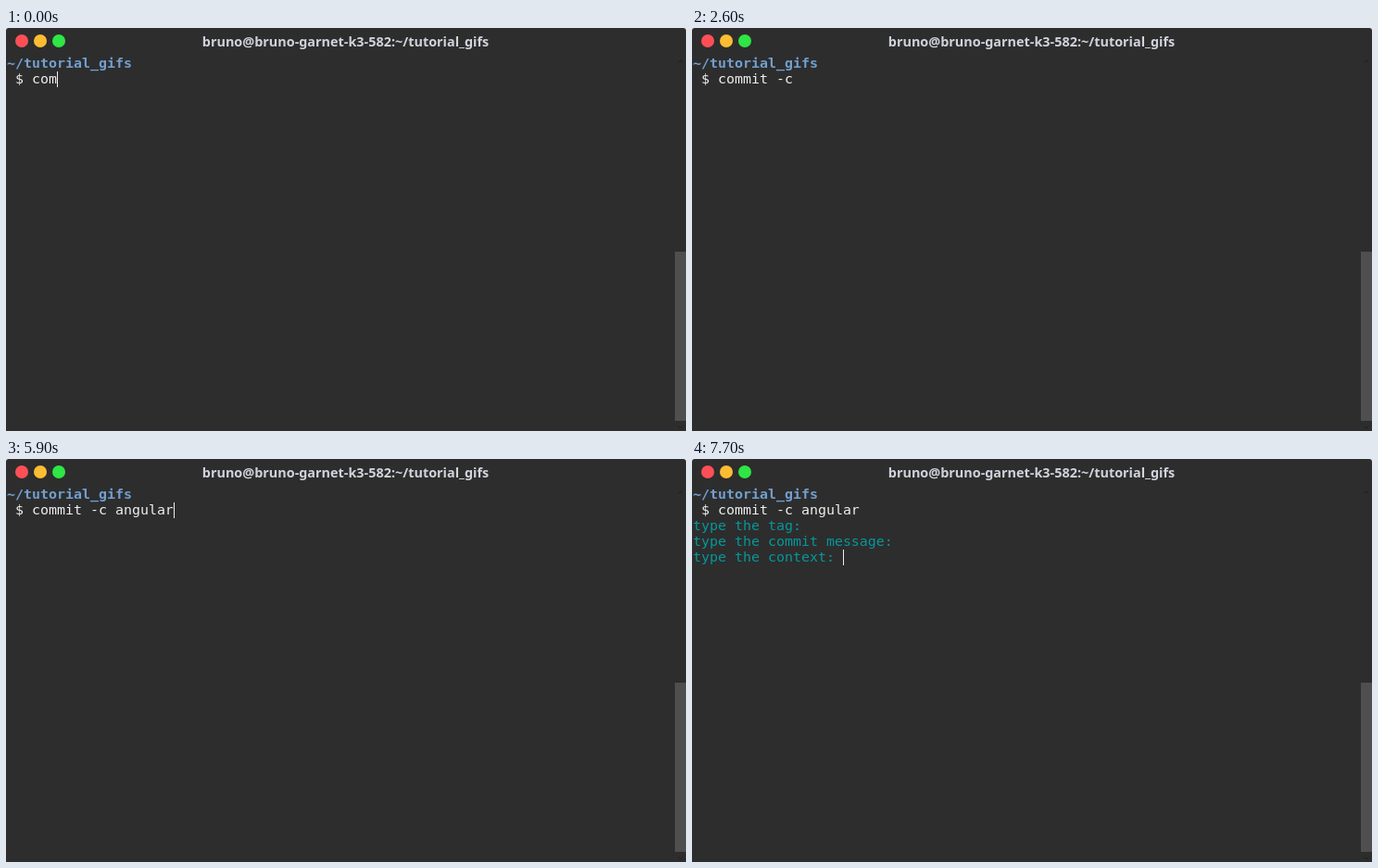
These frames come from a looping animation (734x436 px, 8 s). An HTML page:

```html
<!DOCTYPE html>
<html lang="en">
<head>
<meta charset="utf-8">
<title>Terminal</title>
<style>
  html, body { margin: 0; width: 100%; height: 100%; overflow: hidden; background: #e8e8e8; }
  #window {
    position: absolute; left: 0; top: 0; width: 734px; height: 436px;
    overflow: hidden; background: #2d2d2d; border-radius: 3px 3px 0 0;
  }
  .button { position: absolute; top: 7px; width: 14px; height: 14px; border-radius: 50%; }
  #title {
    position: absolute; left: 0; top: 5px; width: 733px;
    text-align: center; color: #d0d3dc;
    font: 700 14.4px/20px "Noto Sans", "Open Sans", sans-serif;
  }
  #screen {
    position: absolute; left: 1px; top: 30px; color: #eeeeec;
    font: 14.95px/17px "DejaVu Sans Mono", monospace;
  }
  #screen div { height: 17px; white-space: pre; }
  #screen .path { color: #729fcf; font-weight: 700; }
  #screen .prompt { color: #06989a; }
  #cursor { position: absolute; width: 1px; height: 17px; background: #eeeeec; }
  #thumb { position: absolute; left: 722px; top: 242px; width: 12px; height: 183px; background: #4f4f4f; }
  #arrows { position: absolute; left: 722px; top: 30px; fill: none; stroke: #1e1e1e; }
</style>
</head>
<body>
<div id="window">
  <div class="button" style="left:10px;background:#ff4f56"></div>
  <div class="button" style="left:30px;background:#fdbd32"></div>
  <div class="button" style="left:50px;background:#2ee644"></div>
  <div id="title">bruno@bruno-garnet-k3-582:~/tutorial_gifs</div>
  <div id="screen">
    <div class="path">~/tutorial_gifs</div>
    <div id="command"></div>
    <div class="prompt">type the tag: </div>
    <div class="prompt">type the commit message: </div>
    <div class="prompt">type the context: </div>
  </div>
  <div id="cursor"></div>
  <svg id="arrows" width="12" height="406"><path d="M3.5 7.5l2.5-2.5 2.5 2.5M3.5 400.5l2.5 2.5 2.5-2.5"/></svg>
  <div id="thumb"></div>
</div>
<script>
  const LOOP = 8000, CELL = 9, ROW = 17, BLINK = 500;
  const TYPED = " $ com", REST = "mit -c angular";

  // One time per character of REST, then one per Enter press
  const keys = [300, 300, 500, 700, 1700, 1800, 2100, 3000, 3100, 3800, 3900, 4400, 4500, 4700];
  const enters = [6500, 7500, 7700];
  // The cursor goes dark at these times, until the next key or for one blink
  const blinks = [1300, 2600, 5400, 7000];

  const command = document.getElementById("command");
  const cursor = document.getElementById("cursor");
  const prompts = [...document.querySelectorAll(".prompt")];
  const start = performance.now();

  const visibility = on => on ? "visible" : "hidden";
  const latest = (times, now) => Math.max(0, ...times.filter(t => t <= now));

  function draw(now) {
    const passed = times => times.filter(t => t <= now).length;
    const shown = passed(enters);
    const text = TYPED + REST.slice(0, passed(keys));
    command.textContent = text;
    prompts.forEach((line, i) => line.style.visibility = visibility(i < shown));

    const line = shown ? prompts[shown - 1].textContent : text;
    const dark = latest(blinks, now);
    const lit = latest([...keys, ...enters], now) >= dark || now >= dark + BLINK;
    cursor.style.left = 1 + line.length * CELL + "px";
    cursor.style.top = 47 + shown * ROW + "px";
    cursor.style.visibility = visibility(lit);
  }

  function tick() {
    draw(Math.max(0, performance.now() - start) % LOOP);
    requestAnimationFrame(tick);
  }
  tick();
</script>
</body>
</html>
```
